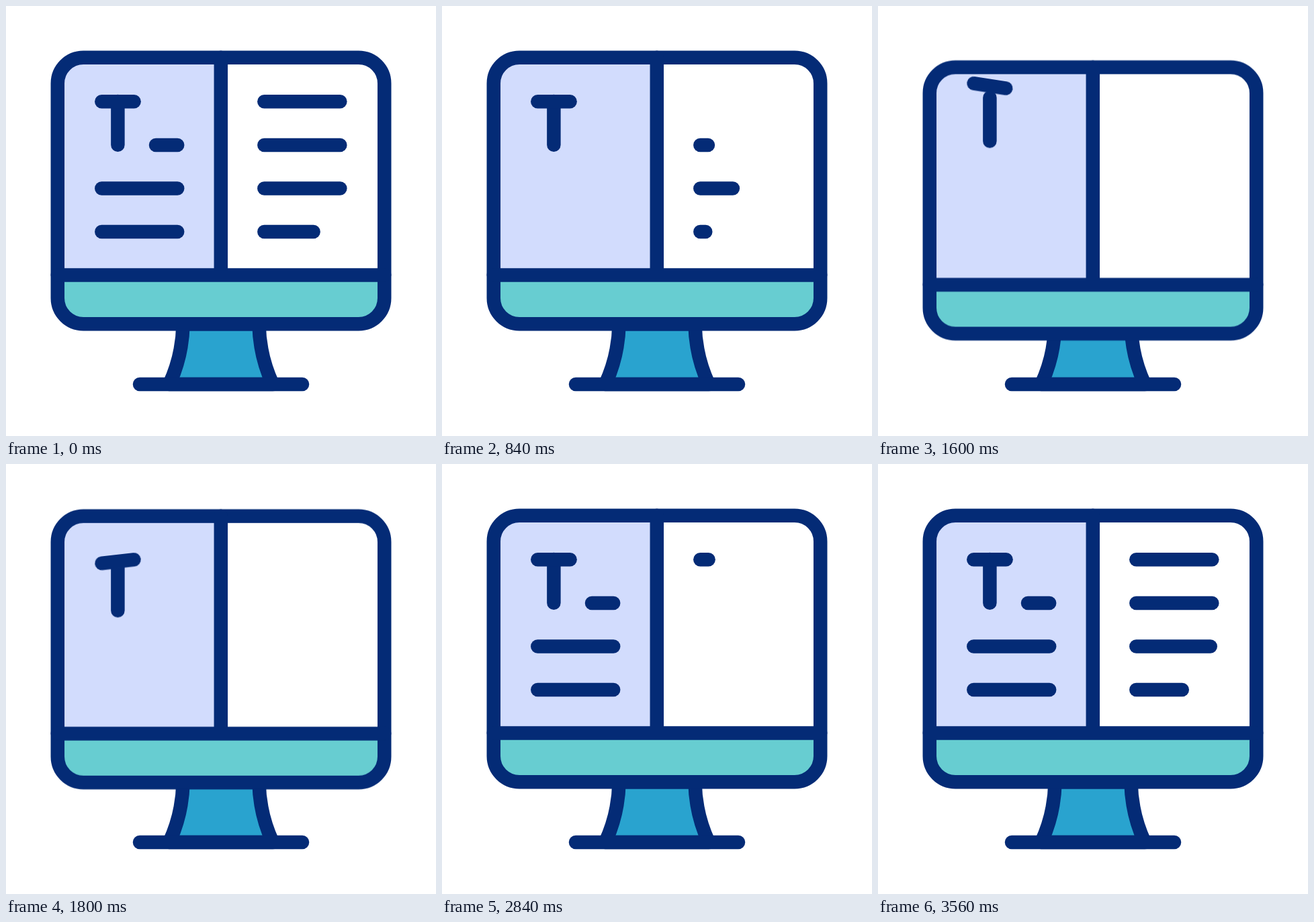
An HTML page that plays this animation: 640 px wide and 640 px high, repeating every 3.6 s.

```html
<!DOCTYPE html>
<html lang="en">
<head>
<meta charset="utf-8">
<title>Text editor on a monitor</title>
<style>
  html, body { margin: 0; width: 100%; height: 100%; overflow: hidden; background: #fff; }
  svg { display: block; width: 100%; height: 100%; }

  .ink { fill: none; stroke: #042b76; stroke-width: 20.5; stroke-linecap: round; stroke-linejoin: round; }

  /* Shared bounce: each part sets its own travel and tilt */
  .hop { animation: hop 3.6s cubic-bezier(.333, 0, .667, 1) infinite; }
  .screen { --y1: 15.5px; --y2: -4.5px; --r1: 0deg; --r2: 0deg; }
  .stem { --y1: -7px; --y2: 18px; --r1: 0deg; --r2: 0deg; }
  .bar { --y1: -25.5px; --y2: 13px; --r1: 10deg; --r2: -12.5deg; transform-origin: 166.4px 142px; }

  @keyframes hop {
    0%, 33.33% { transform: translateY(0) rotate(0deg); }
    40% {
      transform: translateY(var(--y1)) rotate(var(--r1));
      animation-timing-function: cubic-bezier(.85, 0, .35, 1);
    }
    55.7% { transform: translateY(var(--y2)) rotate(var(--r2)); }
    65%, 100% { transform: translateY(0) rotate(0deg); }
  }

  /* Text lines: wiped one after another, then typed again */
  .line {
    stroke-dasharray: 1 2;
    animation: 3.6s cubic-bezier(.333, 0, .667, 1) infinite;
  }
  .l1 { animation-name: l1; }
  .l2 { animation-name: l2; }
  .l3 { animation-name: l3; }
  .r1 { animation-name: r1; }
  .r2 { animation-name: r2; }
  .r3 { animation-name: r3; }
  .r4 { animation-name: r4; }

  @keyframes l1 {
    0%, .4% { stroke-dashoffset: 0; visibility: visible; }
    10.1%, 55.75% { stroke-dashoffset: 1; visibility: hidden; }
    62.7%, 100% { stroke-dashoffset: 0; visibility: visible; }
  }
  @keyframes l2 {
    0%, 4.2% { stroke-dashoffset: 0; visibility: visible; }
    13.9%, 63% { stroke-dashoffset: 1; visibility: hidden; }
    70.06%, 100% { stroke-dashoffset: 0; visibility: visible; }
  }
  @keyframes l3 {
    0%, 8% { stroke-dashoffset: 0; visibility: visible; }
    17.7%, 70.25% { stroke-dashoffset: 1; visibility: hidden; }
    77.3%, 100% { stroke-dashoffset: 0; visibility: visible; }
  }
  @keyframes r1 {
    0%, 11.8% { stroke-dashoffset: 0; visibility: visible; }
    21.5%, 77.47% { stroke-dashoffset: 1; visibility: hidden; }
    84.53%, 100% { stroke-dashoffset: 0; visibility: visible; }
  }
  @keyframes r2 {
    0%, 15.55% { stroke-dashoffset: 0; visibility: visible; }
    25.3%, 85% { stroke-dashoffset: 1; visibility: hidden; }
    92.05%, 100% { stroke-dashoffset: 0; visibility: visible; }
  }
  @keyframes r3 {
    0%, 18.1% { stroke-dashoffset: 0; visibility: visible; }
    27.72%, 92.5% { stroke-dashoffset: 1; visibility: hidden; }
    99.55%, 100% { stroke-dashoffset: 0; visibility: visible; }
  }
  @keyframes r4 {
    0%, 15.65% { stroke-dashoffset: 0; visibility: visible; }
    25.35% { stroke-dashoffset: 1; visibility: hidden; }
    88.6% {
      stroke-dashoffset: 1; visibility: hidden;
      animation-timing-function: cubic-bezier(.35, .05, .7, .85);
    }
    100% { stroke-dashoffset: 0; visibility: visible; }
  }
</style>
</head>
<body>
<svg viewBox="0 0 640 640">
  <g class="ink">
    <path fill="#29a3cf" d="M263.5 473.3C263 505 256 535 243 563H397C384 535 377 505 376.5 473.3Z"/>
    <path d="M199 563H441"/>
  </g>

  <g class="hop screen">
    <rect x="76.8" y="76.8" width="486.4" height="396.4" rx="38.4" fill="#fff"/>
    <path fill="#d2dcfd" d="M319.8 76.8H115.2A38.4 38.4 0 0 0 76.8 115.2V400.5H319.8Z"/>
    <path fill="#67cdd1" d="M76.8 400.5H563.2V434.8A38.4 38.4 0 0 1 524.8 473.2H115.2A38.4 38.4 0 0 1 76.8 434.8Z"/>
    <g class="ink">
      <rect x="76.8" y="76.8" width="486.4" height="396.4" rx="38.4"/>
      <path d="M76.8 400.5H563.2M319.8 76.8V400.5"/>
      <path class="line l1" pathLength="1" d="M223 206.9H255.2"/>
      <path class="line l2" pathLength="1" d="M142.3 271.4H255.2"/>
      <path class="line l3" pathLength="1" d="M142.3 336H255.2"/>
      <path class="line r1" pathLength="1" d="M384.3 142.3H497.3"/>
      <path class="line r2" pathLength="1" d="M384.3 206.9H497.3"/>
      <path class="line r3" pathLength="1" d="M384.3 271.4H497.3"/>
      <path class="line r4" pathLength="1" d="M384.3 336H457.6"/>
    </g>
  </g>

  <g class="ink">
    <path class="hop stem" d="M166.4 142V206.8"/>
    <path class="hop bar" d="M142.3 142.3H190.6"/>
  </g>
</svg>
</body>
</html>
```
